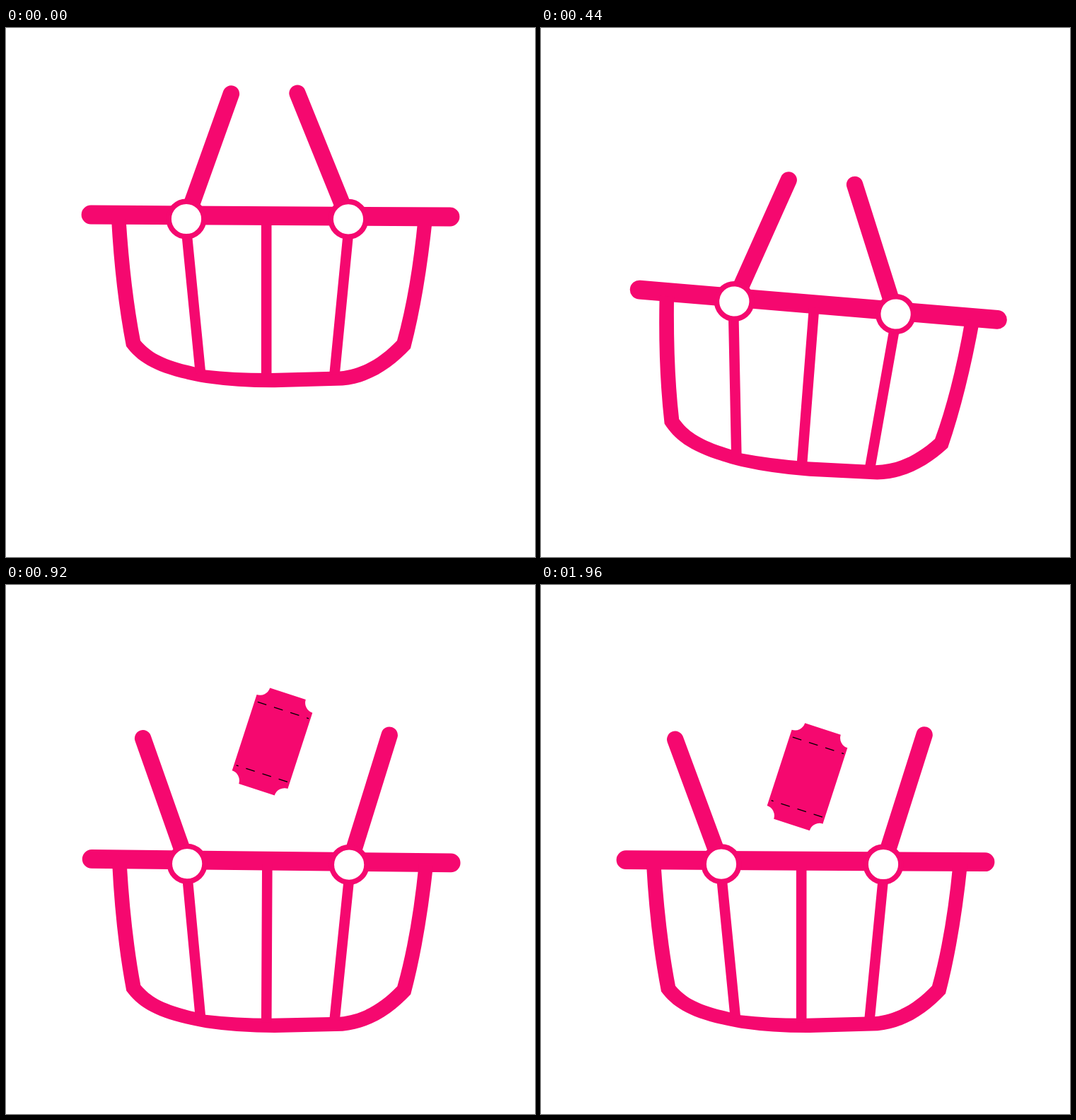
An HTML page that plays this animation: 748x748 px, repeating every 2000 ms.

```html
<!DOCTYPE html>
<html lang="en">
<head>
<meta charset="utf-8">
<title>Basket and ticket</title>
<style>
  html, body { margin: 0; height: 100%; overflow: hidden; background: #fff; }
  svg { display: block; width: 100vw; height: 100vh; }
  .line { fill: none; stroke: #f5086f; }
  .solid { fill: #f5086f; }
  .knob { fill: #fff; stroke: #f5086f; stroke-width: 7.4; }
  .perforation { stroke: #000; stroke-width: 1.3; stroke-dasharray: 13 11.3; }
</style>
</head>
<body>
<svg viewBox="0 0 748 748">
  <g id="ticket">
    <path class="solid" d="M-26.6-71.2H26.6A14.8 14.8 0 0 0 41.4-56.4V56.4A14.8 14.8 0 0 0 26.6 71.2H-26.6A14.8 14.8 0 0 0-41.4 56.4V-56.4A14.8 14.8 0 0 0-26.6-71.2Z"/>
    <path class="perforation" d="M-37-47H39"/>
    <path class="perforation" d="M38 47.5H-38"/>
  </g>
  <g id="basket">
    <g class="line" stroke-width="23.5" stroke-linecap="round">
      <path id="left" d="M0-20V-188"/>
      <path id="right" d="M0-20V-192"/>
    </g>
    <path class="line" stroke-width="26.8" stroke-linecap="round" d="M120 264L628 267"/>
    <path class="solid" d="M149 270Q154.500 370 170 450C188 474 214 490 283 502Q328 508.500 380 508.300L476 505.500C515 502 547 480 572 453Q592 376 603 270H582.500Q573 370 553 442C530 466 505 482 472 485.500L375 488Q325 488.300 282 483.500L267 479.500C225 470 205 460 190 442Q176 370 169.500 270Z"/>
    <path class="line" stroke-width="14.6" d="M255.500 290L275 488M368.200 270V494M484 290L464.500 490"/>
    <circle class="knob" cx="255" cy="270" r="24.8"/>
    <circle class="knob" cx="484" cy="270.300" r="24.8"/>
  </g>
</svg>
<script>
const LOOP = 2000;
const $ = id => document.getElementById(id);
const progress = (t, start, end) => Math.min(1, Math.max(0, (t - start) / (end - start)));
const mix = (a, b, k) => a + (b - a) * k;
const smooth = p => p * p * (3 - 2 * p);

// Cubic Bezier easing with flat ends: control points (x1, 0) and (x2, 1)
function ease(p, x1, x2) {
  let lo = 0, hi = 1;
  for (let i = 0; i < 24; i++) {
    const s = (lo + hi) / 2, r = 1 - s;
    if (3 * s * r * r * x1 + 3 * s * s * r * x2 + s ** 3 < p) lo = s;
    else hi = s;
  }
  return smooth(lo);
}

// Landing wobble: [time, degrees]
const wobble = [[360, 0], [460, 4.9], [565, -1.05], [720, 0.5], [1160, 0]];

function tilt(t) {
  for (let i = 1; i < wobble.length; i++) {
    const [t0, a] = wobble[i - 1], [t1, b] = wobble[i];
    if (t < t1) return mix(a, b, smooth(progress(t, t0, t1)));
  }
  return 0;
}

const place = (id, x, y, angle) =>
  $(id).setAttribute('transform', `translate(${x} ${y}) rotate(${angle})`);

function draw() {
  const t = performance.now() % LOOP;
  const fall = 124.7 * progress(t, 0, 360) ** 3.7;
  const open = ease(progress(t, 560, 980), 0.4, 0.3);
  const drop = ease(progress(t, 455, 1377), 0.4, 0);

  $('basket').setAttribute('transform', `translate(0 ${fall}) rotate(${tilt(t)} 370 502)`);
  place('left', 255, 270, mix(19.7, -20.3, open));
  place('right', 484, 270.3, mix(-22, 17.6, open));
  place('ticket', 376.5, 271.2 - 370 * (1 - drop), 18);
  requestAnimationFrame(draw);
}
draw();
</script>
</body>
</html>
```
